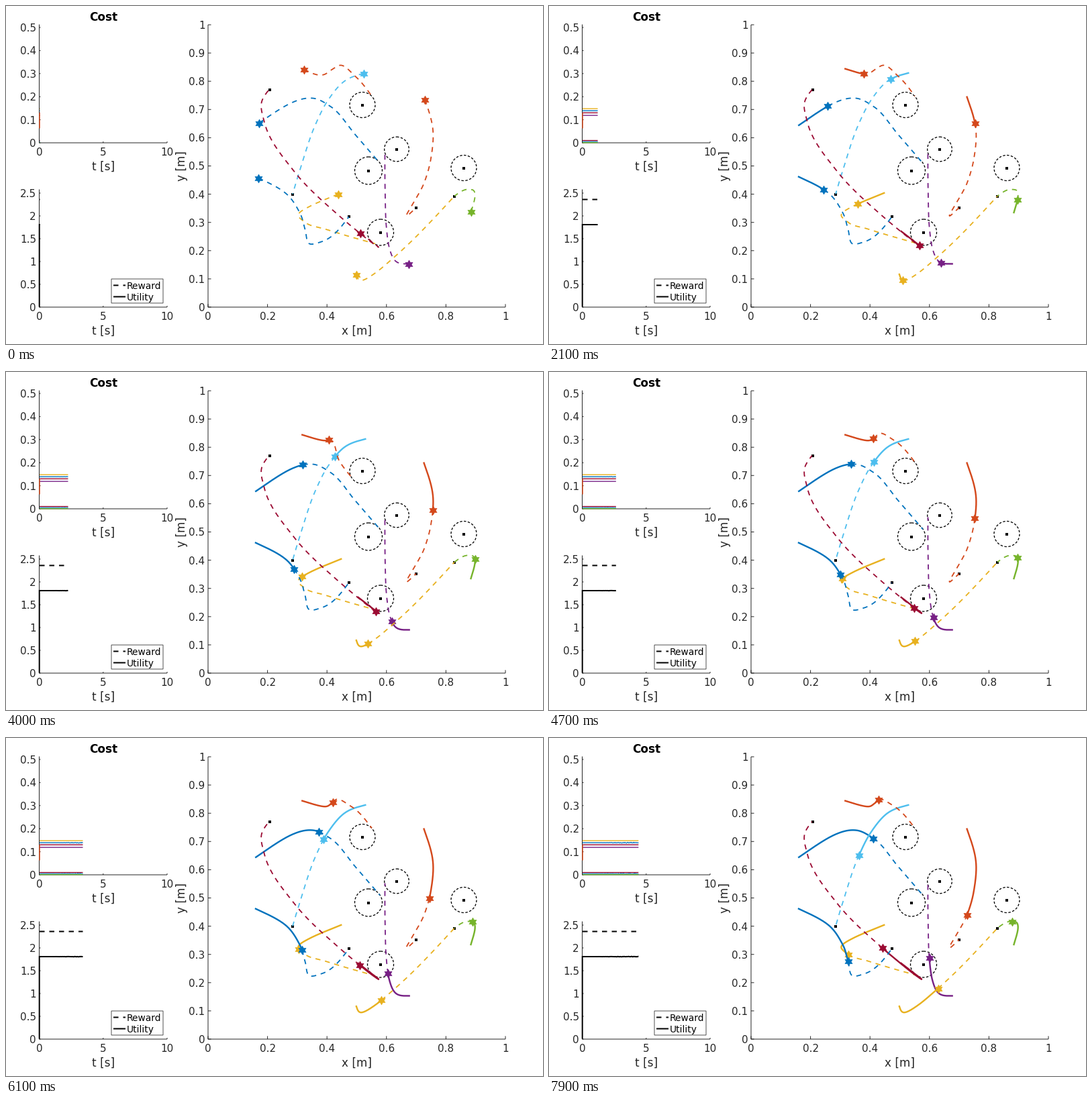
These frames come from a looping animation (800 by 504 pixels, 8 s). A matplotlib script:

```python
import numpy as np
import matplotlib.pyplot as plt
from matplotlib.animation import FuncAnimation
from matplotlib.path import Path
from matplotlib.patches import Circle, Rectangle

W, H, DPI = 800, 504, 100
FRAMES, STEP = 80, 100
PX = 72 / DPI                     # points per pixel
KEYS = [0, 27, 53, 79]            # frames at which agents pass their key points
LEAD = -3                         # the motion began just before the loop
INK = "#262626"
BLUE, ORANGE, YELLOW, PURPLE = "#0072BD", "#D4481B", "#E8B11F", "#772085"
GREEN, CYAN, CRIMSON = "#76B42B", "#4DBEEE", "#9B0A32"
DASH = (7.5, 7)

plt.rcParams["font.family"] = "DejaVu Sans"
fig = plt.figure(figsize=(W / DPI, H / DPI), dpi=DPI, facecolor="white")
ax = fig.add_axes([0, 0, 1, 1])
ax.set(xlim=(0, W), ylim=(H + 0.5, 0.5))
ax.axis("off")


def line(x, y, color, width, dash=None, z=2):
    style = (0, tuple(d / width for d in dash)) if dash else "-"
    return ax.plot(x, y, color=color, lw=width * PX, ls=style, zorder=z,
                   snap=False, solid_capstyle="butt", dash_capstyle="butt")[0]


def text(x, y, s, size, ha="center", color=INK, **kw):
    ax.text(x, y, s, fontsize=size * PX, ha=ha, color=color,
            va=kw.pop("va", "center_baseline"), **kw)


def plot_axes(x0, x1, y0, y1, xmax, xstep, ymax, ystep, unit, tick):
    """Left and bottom axis with inward ticks; unit is pixels per y unit."""
    line([x0, x0, x1], [y0, y1, y1], INK, 1, z=1)
    for v in np.arange(0, xmax + xstep / 2, xstep):
        x = x0 + (x1 - x0) * v / xmax
        line([x, x], [y1, y1 - tick], INK, 1, z=1)
        text(x, y1 + 13, f"{v:.2g}", 15.3)
    for v in np.arange(0, ymax + ystep / 2, ystep):
        y = y1 - unit * v
        line([x0, x0 + tick], [y, y], INK, 1, z=1)
        text(x0 - 4.5, y, f"{v:.2g}", 15.3, ha="right")


plot_axes(49.5, 240, 28, 204.5, 10, 5, 0.5, 0.1, 344, 2)
plot_axes(49.5, 240, 274, 449.5, 10, 5, 2.5, 0.5, 68, 2)
plot_axes(301, 744, 28.5, 449.5, 1, 0.2, 1, 0.1, 421, 4.5)
text(145, 15, "Cost", 16.9, color="black", weight="bold")
text(145, 238, "t [s]", 16.9)
text(145, 483, "t [s]", 16.9)
text(522.5, 483, "x [m]", 16.9)
text(262, 239, "y [m]", 16.9, rotation=90, va="center")

# legend
ax.add_patch(Rectangle((157, 407.5), 77, 36, fc="white", ec=INK,
                       lw=0.8 * PX, snap=False, zorder=8))
for y, name, dash in [(417, "Reward", DASH), (434, "Utility", None)]:
    line([160, 178], [y, y], "black", 2, dash, z=9)
    text(179.5, y, name, 13.8, ha="left", color="black", zorder=9)

# obstacles and goals
obstacles = [(531, 148, 19), (540, 246, 20.5), (582, 214, 18.3),
             (682, 242, 19), (558, 338, 19.5)]
goals = [(393, 125), (427, 281.5), (511, 314.5), (611, 301), (668, 284)]
for x, y, r in obstacles:
    ax.add_patch(Circle((x, y), r, fill=False, ec="black", lw=1.3 * PX,
                        ls=(0, (2.7, 1.9)), zorder=2))
for x, y in [o[:2] for o in obstacles] + goals:
    ax.add_patch(Rectangle((x - 2, y - 2), 4, 4, fc="black", lw=0, zorder=2))


class Curve:
    """Cubic Hermite curve: timed key points, then a route at steady speed."""

    def __init__(self, keys, route):
        p = np.array(keys + route, float)
        k = len(keys)
        gap = np.hypot(*np.diff(p, axis=0).T)
        speed = gap[k - 2] / (KEYS[k - 1] - KEYS[k - 2])
        t = np.append(KEYS[:k], KEYS[k - 1] + np.cumsum(gap[k - 1:]) / speed)
        h = np.diff(t)[:, None]
        d = np.diff(p, axis=0) / h
        m = (d[:-1] * h[1:] + d[1:] * h[:-1]) / (h[1:] + h[:-1])
        self.m = np.vstack([1.5 * d[0] - 0.5 * m[0], m,
                            1.5 * d[-1] - 0.5 * m[-1]])
        self.t, self.p = t, p

    def __call__(self, t):
        t = np.atleast_1d(t)
        i = np.clip(np.searchsorted(self.t, t, "right") - 1, 0, len(self.t) - 2)
        h = (self.t[i + 1] - self.t[i])[:, None]
        s = (t - self.t[i])[:, None] / h
        return ((1 + 2 * s) * (1 - s) ** 2 * self.p[i]
                + s * (1 - s) ** 2 * h * self.m[i]
                + s ** 2 * (3 - 2 * s) * self.p[i + 1]
                + s ** 2 * (s - 1) * h * self.m[i + 1])

    def span(self, a, b):
        return self(np.linspace(a, b, 150)).T


ang = np.pi / 2 + np.arange(13) * np.pi / 6
rad = np.where(np.arange(13) % 2, 3 ** -0.5, 1)
HEXAGRAM = Path(np.c_[rad * np.cos(ang), rad * np.sin(ang)], closed=True)
agents = []


class Agent:
    """A star with its trail and the dashed route still ahead."""

    def __init__(self, color, keys, route):
        z = 3 + len(agents) / 10
        self.path = Curve(keys, route)
        self.plans = [(FRAMES, self.path)]
        self.ahead = line([], [], color, 1.8, DASH, z)
        self.trail = line([], [], color, 2.4, None, z + 0.03)
        self.star, = ax.plot([], [], ls="", marker=HEXAGRAM, ms=13 * PX,
                             mfc=color, mec=color, mew=0.5 * PX, zorder=z + 0.06)
        agents.append(self)

    def replan(self, until, keys, route):
        self.plans.insert(-1, (until, Curve(keys, route)))

    def update(self, n):
        plan = next(p for until, p in self.plans if n < until)
        x, y = plan.span(n, plan.t[-1])
        x[0], y[0] = self.path(n)[0]
        self.ahead.set_data(x, y)
        self.trail.set_data(*(self.path.span(LEAD, n) if n else ([], [])))
        self.star.set_data(x[:1], y[:1])


Agent(BLUE, [(377, 175), (425, 145), (457, 138), (483, 150)],
      [(520, 192), (557, 235)])
Agent(ORANGE, [(624, 140), (636, 185), (633, 228), (623, 264)],
      [(598, 313), (611, 301)])
Agent(YELLOW, [(495, 281), (453, 299), (435.5, 311.5), (445.5, 323)],
      [(475, 333), (550, 355)])
Agent(PURPLE, [(599.5, 385), (580.5, 381), (571, 361), (566.5, 328.5)],
      [(565, 290), (564.5, 217)])
Agent(GREEN, [(693, 307), (698.5, 286), (697, 276), (690, 274)], [(668, 284)])
Agent(CYAN, [(533, 101), (503, 113.5), (479, 142), (462, 175)],
      [(440, 238), (427, 281)])
Agent(CRIMSON, [(528, 339), (555, 360), (538, 348), (496.5, 313.5)],
      [(430, 248), (385, 174), (381, 143), (392, 125)])
Agent(BLUE, [(376, 257), (417, 280), (437.5, 308.5), (445.5, 333.5)],
      [(452, 355), (470, 352), (511, 314.5)])

# this agent changes its mind about the obstacle ahead
keys = [(444, 95), (474, 102.7), (485, 98), (491, 92.5)]
wary = Agent(ORANGE, keys, [(512, 101), (545, 135)])
wary.replan(37, keys[:2], [(486, 95), (497, 89), (520, 105), (545, 135)])
wary.replan(45, keys[:2], [(481, 101), (497, 134), (517, 160)])

Agent(YELLOW, [(522, 401), (530, 409.7), (551, 398), (579.5, 374)],
      [(668, 284)])

# time traces, with a ripple that grows
rng = np.random.default_rng(4)
T = np.arange(0, 5, 0.05)
grow = np.clip((T - 1) / 3, 0, 1)
traces = []


def trace(y, color, width, ripple=0, dash=None):
    noise = ripple * grow * rng.uniform(-1, 1, T.size)
    traces.append((line([], [], color, width, dash), y + noise))


for value, color, ripple in [(0.139, BLUE, 0.7), (0.130, CRIMSON, 0),
                             (0.148, YELLOW, 0), (0.119, PURPLE, 0),
                             (0.005, BLUE, 0.8), (0.003, CYAN, 0.2),
                             (0.001, GREEN, 0), (0.010, CRIMSON, 0)]:
    trace(204.5 - 344 * value, color, 1.4, ripple)
trace(289, "black", 2, dash=DASH)
trace(326.5, "black", 2, 0.4)
line([50, 50], [160, 183], ORANGE, 1.5)
line([49.7, 49.7], [449, 325.5], "black", 2)


def update(n):
    now = 0.055 * n + 0.03
    t = np.append(T[T < now], now)
    for artist, y in traces:
        artist.set_data(50 + 19.05 * t, np.interp(t, T, y))
    for a in agents:
        a.update(n)
    return []


anim = FuncAnimation(fig, update, frames=FRAMES, interval=STEP,
                     init_func=lambda: [], repeat=True, repeat_delay=0)
plt.show()
```
